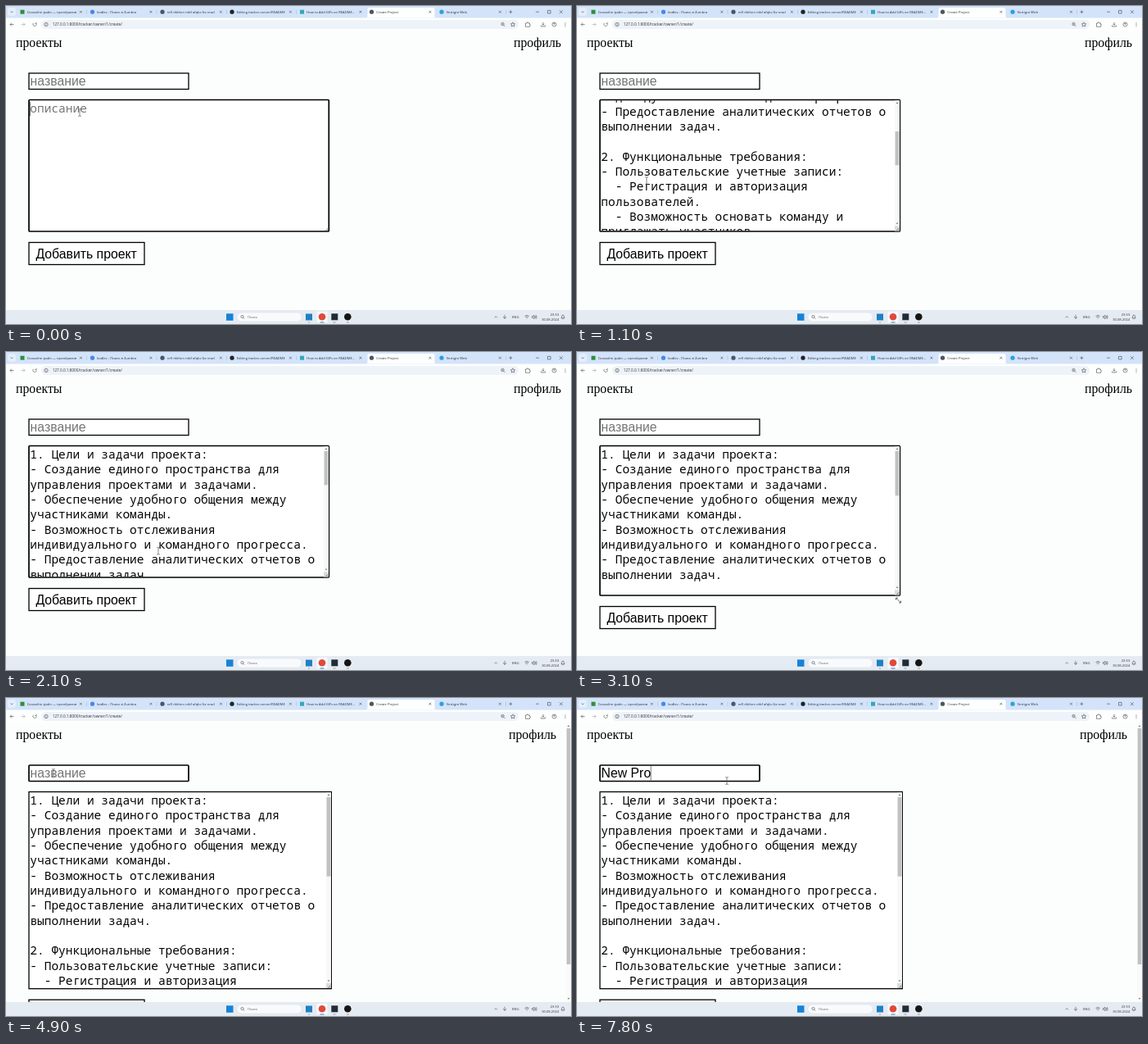
Animation of 690x388 px, one loop 8 s. Source, as an HTML page:

```html
<!DOCTYPE html>
<html lang="ru">
<head>
<meta charset="utf-8">
<title>Create Project</title>
<style>
  html, body { margin: 0; width: 100%; height: 100%; overflow: hidden; }
  svg { display: block; width: 100%; height: 100%; }
  text { white-space: pre; }
  .ui { font: 4.15px "Open Sans", sans-serif; fill: #333; }
  .serif { font: 15.8px "Liberation Serif", serif; }
  .sans { font: 15.8px "Liberation Sans", sans-serif; }
  .mono { font: 14.5px "Noto Sans Mono", monospace; }
  .hint { fill: #757575; }
  .field { fill: #fff; stroke: #000; stroke-width: 1.3; }
  .focus { stroke-width: 1.7; rx: 1px; }
  .icon { fill: none; stroke: #444; stroke-width: .6; }
  .thumb { fill: #c1c1c1; }
  .arrow { fill: #555; }
  .end { text-anchor: end; }
</style>
</head>
<body>
<svg viewBox="0 0 690 388" preserveAspectRatio="none">
  <defs>
    <clipPath id="areaClip"><rect id="areaClipBox" x="28.5" y="115.2" width="359.5"/></clipPath>
  </defs>

  <!-- page -->
  <rect width="690" height="388" fill="#fcfefe"/>
  <text class="serif" x="12" y="50">проекты</text>
  <text class="serif end" id="profile" y="50">профиль</text>
  <rect class="field" id="nameBox" x="28" y="82" width="195" height="19.5"/>
  <text class="sans" id="name" x="29.6" y="97.2"></text>
  <rect class="field" id="area" x="28" y="114.5"/>
  <text class="mono hint" id="areaHint" x="29.3" y="130">описание</text>
  <g clip-path="url(#areaClip)"><g class="mono" id="lines"></g></g>
  <g id="areaBar">
    <rect id="areaTrack" y="115.2" width="6" fill="#f8f8f8"/>
    <rect class="thumb" id="areaThumb" width="4.8"/>
    <path class="arrow" id="areaUp" d="M-1.3 .7L0-.8L1.3 .7z"/>
    <path class="arrow" id="areaDown" d="M-1.3-.7L0 .8L1.3-.7z"/>
    <rect id="areaCorner" width="6" height="6" fill="#dcdcdc"/>
  </g>
  <path class="icon" id="grip" d="M-4-1L-1-4M-2-1L-1-2"/>
  <rect id="caret" width=".8" opacity=".65"/>
  <g id="button">
    <rect class="field" x="28" y="13.5" width="141" height="27"/>
    <text class="sans" x="36.4" y="32.5">Добавить проект</text>
  </g>
  <g id="pageBar">
    <rect x="684" y="30" width="6" height="341" fill="#fafafa"/>
    <rect class="thumb" x="684.7" y="37" width="4.6" height="288"/>
    <path class="arrow" d="M685.7 34.7l1.3-1.5 1.3 1.5zM685.7 366.3l1.3 1.5 1.3-1.5z"/>
  </g>

  <!-- browser bars -->
  <rect width="690" height="15" fill="#d3e3fa"/>
  <rect y="14.5" width="690" height="15.5" fill="#fdfefe"/>
  <path d="M439 14.6q2.5 0 2.5-2.5V4.500q0-2.500 2.500-2.500H521q2.500 0 2.500 2.500V12q0 2.600 2.500 2.600z" fill="#fdfefe"/>
  <rect x="2" y="2" width="10" height="10" rx="3" fill="#e4eefc"/>
  <path class="icon" d="M5.500 6.500l1.500 1.500 1.500-1.500"/>
  <g id="tabs"></g>
  <path class="icon" d="M614.300 7.200h4M616.300 5.200v4M647 7.200h4M661.500 5.400h3.600v3.600h-3.600zM676 5.300l3.800 3.800m0-3.800l-3.800 3.800"/>
  <rect x="43" y="17" width="583" height="11" rx="5.500" fill="#eef3f9"/>
  <path class="icon" d="M9.500 22.500H5m2-2l-2 2 2 2M33.500 20.800a2.200 2.200 0 1 0 3.800 1.500m-.2-2.500v1.700h-1.700"/>
  <path class="icon" d="M18.500 22.500H23m-2-2l2 2-2 2" opacity=".5"/>
  <circle class="icon" cx="49" cy="22.500" r="2.200"/>
  <path class="icon" d="M49 22.200v1.500M49 21v.5"/>
  <text class="ui" x="56.800" y="24.200" style="font-size:4.680px">127.0.0.1:8000/tracker/owner/1/create/</text>
  <circle class="icon" cx="606.500" cy="22" r="1.700"/>
  <path class="icon" d="M607.800 23.300l1.600 1.600M605.600 22h1.800"/>
  <path class="icon" d="M619 19.800l.8 1.800 2 .2-1.500 1.300.4 1.900-1.700-1-1.700 1 .4-1.900-1.500-1.300 2-.2z"/>
  <path class="icon" d="M634.500 21h1.500q0-1.300 1-1.300t1 1.300h1.500v1.500q1 0 1 .8t-1 .8v1.200h-5z"/>
  <path class="icon" d="M656 19.800v3.500m-1.500-1.500l1.500 1.500 1.500-1.500M653.500 23.500v1.500h5v-1.500"/>
  <circle class="icon" cx="669.500" cy="22.500" r="2.500"/>
  <circle class="icon" cx="669.500" cy="21.700" r=".7"/>
  <path d="M683 20.500v.8m0 1v.8m0 1v.8" stroke="#444" stroke-width=".9"/>

  <!-- taskbar -->
  <rect y="371" width="690" height="17" fill="#e5ebf2"/>
  <rect x="269" y="375.300" width="8.500" height="8.500" fill="#1683d8"/>
  <rect x="282" y="374" width="79" height="11" rx="5.500" fill="#f8fafc" stroke="#d5dbe2" stroke-width=".4"/>
  <circle class="icon" cx="288.500" cy="379" r="1.600"/>
  <path class="icon" d="M289.700 380.200l1.500 1.500"/>
  <text class="ui" x="295" y="381" style="fill:#666">Поиск</text>
  <rect x="379.500" y="372.800" width="13" height="13.500" rx="1.500" fill="#f6f9fc"/>
  <rect x="366" y="375.500" width="8" height="8" fill="#1f80c4"/>
  <circle cx="386" cy="379.300" r="4.300" fill="#e0493b"/>
  <rect x="397.300" y="375.300" width="8" height="8" fill="#202c33"/>
  <circle cx="417.300" cy="379.300" r="4.300" fill="#151515"/>
  <path d="M369 386h2m28.500 0h3m13.500 0h3" stroke="#8a9096" stroke-width=".8"/>
  <path d="M383.500 386h5" stroke="#1673c6" stroke-width=".9"/>
  <path class="icon" d="M596.500 380.300l1.700-1.700 1.700 1.700M609 376.800v2.700m-1.500-.5q0 1.700 1.500 1.700t1.500-1.700m-1.500 1.700v1.200"/>
  <text class="ui" x="618" y="381">ENG</text>
  <path class="icon" d="M633.500 378.500q2.600-2.300 5.200 0M634.500 379.800q1.600-1.300 3.200 0M635.700 381.200h.8M642.500 378.500h1l1.500-1.300v4.500l-1.500-1.300h-1zM646.200 378q1 1.500 0 3M647.300 377.200q1.700 2.300 0 4.600"/>
  <text class="ui end" x="675.300" y="378.300">23:53</text>
  <text class="ui end" x="675.300" y="383.500">30.08.2024</text>
  <path class="icon" d="M678 380.800q.7-.6.7-2 0-1.700 1.400-1.700t1.400 1.700q0 1.400.7 2zM679.500 381.700h1.200"/>

  <!-- pointers -->
  <path id="beam" d="M-1.800-4.500Q0-4.500 0-3.500Q0-4.500 1.800-4.500M0-3.500V3.500M-1.800 4.500Q0 4.500 0 3.500Q0 4.500 1.800 4.500" fill="none" stroke="#555" stroke-width=".7"/>
  <path id="sizer" d="M-3-.5V-3H-.5M-3-3L3 3M3 .5V3H.5" fill="none" stroke="#444" stroke-width=".8"/>
</svg>
<script>
const DURATION = 8000, LINE = 18.33, TOP = 114.5;
const $ = id => document.getElementById(id);

const description = `1. Цели и задачи проекта:
- Создание единого пространства для
управления проектами и задачами.
- Обеспечение удобного общения между
участниками команды.
- Возможность отслеживания
индивидуального и командного прогресса.
- Предоставление аналитических отчетов о
выполнении задач.

2. Функциональные требования:
- Пользовательские учетные записи:
  - Регистрация и авторизация
пользователей.
  - Возможность основать команду и
приглашать участников.
- Управление проектами:
  - Создание и редактирование
проектов.
  - Назначение ответственных лиц.
- Управление задачами:
  - Создание задач и подзадач.
  - Установка сроков и приоритетов.
  - Отслеживание статуса задач.

3. Технические требования:
- Удобный интерфейс пользователя.
- Поддержка мобильных устройств.
- Надежное хранение данных.
- Защита учетных записей.`.split('\n');
const CONTENT = description.length * LINE;

// x, icon shape, icon colour, title
const tabs = [
  [20, 'square', '#2f8f3a', 'Скачайте файл — преобразов'],
  [105.5, 'circle', '#4a86e8', 'kodlev - Поиск в Zumbra'],
  [191, 'circle', '#4d5660', 'refl rkbhen ntbf afqks lkz reacl'],
  [276, 'circle', '#222', 'Editing tracker-server/README'],
  [361.500, 'square', '#35a7b5', 'How to Add GIFs on README...'],
  [446.500, 'circle', '#4d5660', 'Create Project'],
  [532, 'circle', '#2aa1de', 'Vestigro Web'],
];
$('tabs').innerHTML = tabs.map(([x, shape, color, title], i) => {
  const icon = shape === 'circle'
    ? `<circle cx="${x}" cy="7.2" r="2.6" fill="${color}"/>`
    : `<rect x="${x - 2.5}" y="4.700" width="5" height="5" fill="${color}"/>`;
  const divider = i === 4 || i === 5 ? '' : `<path d="M${x + 78.5} 4.5v5.500" stroke="#9fb4d0" stroke-width=".5"/>`;
  return `${icon}<text class="ui" x="${x + 5.7}" y="8.800">${title}</text>
    <path class="icon" d="M${x + 70} 5.800l2.800 2.800m0-2.800l-2.800 2.800"/>${divider}`;
}).join('');

$('lines').innerHTML = description.map((line, i) =>
  `<text x="29.3" y="${130 + i * LINE}">${line}</text>`).join('');

// Linear interpolation through [time, ...values] keys
function follow(keys, t) {
  const next = keys.findIndex(key => key[0] > t);
  if (next === 0) return keys[0].slice(1);
  if (next < 0) return keys.at(-1).slice(1);
  const a = keys[next - 1], b = keys[next], k = (t - a[0]) / (b[0] - a[0]);
  return a.slice(1).map((v, i) => v + (b[i + 1] - v) * k);
}

const scrollKeys = [[300, CONTENT - 160], [1100, 124.5], [1400, 49], [1700, 0]];
const cornerKeys = [[2900, 394.3, 275], [3100, 394.3, 297], [3700, 397.3, 354.7]];
const pointerKeys = [
  [100, 90, 130], [800, 85, 212], [1100, 85, 213], [1400, 87, 214], [1700, 92, 217],
  [1900, 127, 232], [2800, 392.5, 280], [2900, 392.5, 281], [3100, 392.5, 303],
  [3700, 395.5, 360], [3850, 394, 357], [4300, 58, 91], [5099, 58, 91], [5100, 183, 101],
];
const typing = [5900, 6100, 6300, 6500, 7300, 7600, 7800];
const blinks = [[0, 500], [4400, 4900], [5400, 7000], [7300, DURATION]];

function set(id, attrs) {
  for (const name in attrs) $(id).setAttribute(name, attrs[name]);
}
const move = (id, x, y) => set(id, { transform: `translate(${x} ${y})` });
const show = (id, on) => set(id, { display: on ? 'inline' : 'none' });

function drawArea(t, right, bottom) {
  const pasted = t >= 200, height = bottom - TOP, barX = right - 6.3;
  const trackEnd = bottom - 12.5, track = trackEnd - 121;
  const [scroll] = follow(scrollKeys, t);
  set('area', { width: right - 28, height });
  set('areaClipBox', { height: height - 1.4, width: barX - 28.5 });
  show('areaHint', !pasted);
  show('lines', pasted);
  show('areaBar', pasted);
  move('lines', 0, -scroll);
  set('areaTrack', { x: barX, height: height - 1.4 });
  set('areaThumb', { x: barX + .6, y: 121 + scroll / CONTENT * track, height: height / CONTENT * track });
  move('areaUp', barX + 3, 118.3);
  move('areaDown', barX + 3, bottom - 9.5);
  set('areaCorner', { x: barX, y: bottom - 6.7 });
  move('grip', right, bottom);
}

function drawName(t) {
  const focused = t >= 4300;
  const typed = 'New Pro'.slice(0, typing.filter(time => t >= time).length);
  $('name').textContent = typed || 'название';
  $('name').classList.toggle('hint', !typed);
  $('nameBox').classList.toggle('focus', focused);
  $('area').classList.toggle('focus', !focused);
  const caretX = 29.2 + (typed ? $('name').getComputedTextLength() : 0);
  set('caret', { x: caretX, y: focused ? 83 : 117, height: focused ? 17.5 : 17 });
  show('caret', blinks.some(([from, to]) => t >= from && t < to) && (focused || t < 200));
}

function draw(t) {
  const [right, bottom] = follow(cornerKeys, t);
  const overflow = bottom > 318;
  drawArea(t, right, bottom);
  drawName(t);
  move('button', 0, bottom);
  show('pageBar', overflow);
  set('profile', { x: overflow ? 672 : 678 });

  const [x, y] = follow(pointerKeys, t);
  const resizing = t >= 2700 && t < 3850;
  move('beam', x, y);
  move('sizer', x, y);
  show('beam', !resizing);
  show('sizer', resizing);
}

function frame(now) {
  draw(Math.floor(now % DURATION / 100) * 100);
  requestAnimationFrame(frame);
}
draw(0);
requestAnimationFrame(frame);
</script>
</body>
</html>
```
